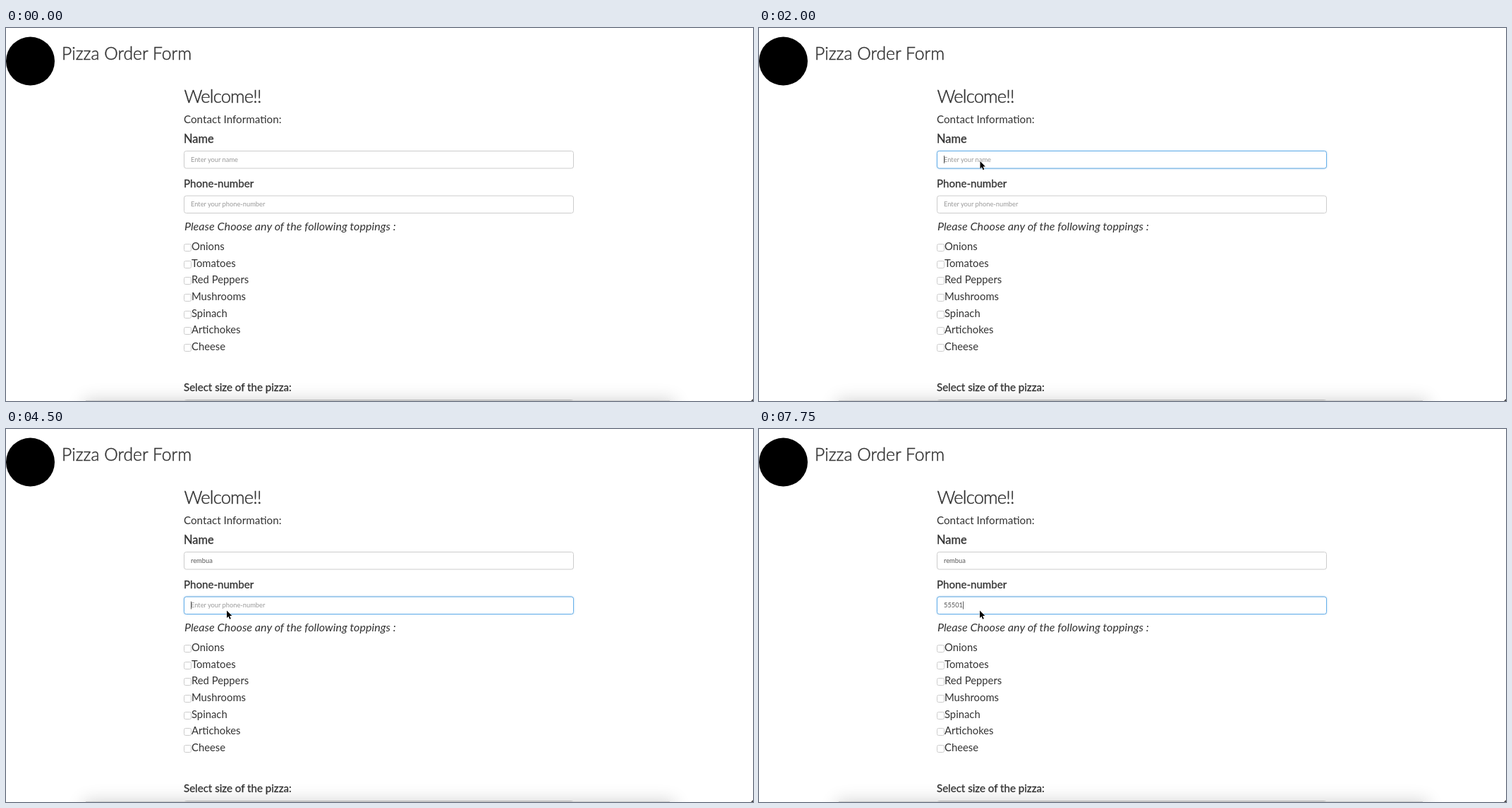
An HTML page that plays this animation: 1059 px wide and 529 px high, repeating every 8 s.

```html
<!DOCTYPE html>
<html lang="en">
<head>
<meta charset="utf-8">
<title>Pizza Order Form</title>
<style>
html, body { margin: 0; width: 100%; height: 100%; overflow: hidden; background: #fff; }
svg { display: block; font-family: Lato, "Open Sans", sans-serif; fill: #333; }
text { white-space: pre; }
.title { font-weight: 300; stroke: #333; stroke-width: .45px; }
.label { stroke: #333; stroke-width: .3px; }
.box { fill: #fff; stroke: #ccc; }
.glow { fill: #fff; stroke: #66afe9; filter: drop-shadow(0 0 1.5px rgba(102,175,233,.45)); }
.entry { font-size: 9.3px; }
</style>
</head>
<body>
<svg id="stage" width="1059" height="529" viewBox="0 0 1059 529">
  <defs>
    <filter id="blur" x="-20%" y="-200%" width="140%" height="500%"><feGaussianBlur stdDeviation="12"/></filter>
  </defs>
  <circle cx="34.5" cy="47" r="34.5" fill="#000"/>
  <text class="title" x="79" y="45" font-size="24.7">Pizza Order Form</text>
  <text class="title" x="252.5" y="106" font-size="25.5" letter-spacing="-.8">Welcome!!</text>
  <text x="252" y="134.5" font-size="15.2">Contact Information:</text>
  <text class="label" x="252" y="163" font-size="16.4">Name</text>
  <text class="label" x="252" y="226" font-size="15.1">Phone-number</text>
  <text x="253" y="287" font-size="16.15" font-style="italic">Please Choose any of the following toppings :</text>
  <g id="toppings" font-size="14.8"></g>
  <text class="label" x="252" y="515" font-size="15.1">Select size of the pizza:</text>
  <rect class="box" x="252.5" y="527.5" width="552" height="25" rx="3"/>
  <g id="fields"></g>
  <rect x="110" y="527" width="838" height="45" fill="#000" opacity=".17" filter="url(#blur)"/>
  <rect x="113" y="528" width="828" height="1" fill="#ccc"/>
  <path d="M1059 526v3h-3z" fill="#444"/>
  <path id="cursor" d="M0 0V10.4l2.4-2.2 1.7 4 1.7-.7-1.7-3.9H7.4z" fill="#000" stroke="#fff" paint-order="stroke"/>
</svg>
<script>
const LOOP = 8000;
const $ = id => document.getElementById(id);

function add(parent, tag, attrs, text = '') {
  const el = document.createElementNS('http://www.w3.org/2000/svg', tag);
  for (const key in attrs) el.setAttribute(key, attrs[key]);
  el.textContent = text;
  return parent.appendChild(el);
}

// Value of the last [time, value] step that has begun
const at = (steps, t) => steps.reduce((value, step) => t >= step[0] ? step[1] : value, steps[0][1]);

// On/off state toggled at each listed time, starting off
const toggled = (times, t) => times.filter(time => t >= time).length % 2 === 1;

['Onions', 'Tomatoes', 'Red Peppers', 'Mushrooms', 'Spinach', 'Artichokes', 'Cheese'].forEach((name, i) => {
  const y = 315 + i * 23.65;
  add($('toppings'), 'rect', { class: 'box', x: 252.5, y: Math.round(y - 9) + .5, width: 10, height: 10, rx: 2 });
  add($('toppings'), 'text', { x: 263, y }, name);
});

const fields = [
  {
    y: 174.5, hint: 'Enter your name',
    focus: [[0, 0], [2000, 1], [4250, .5], [4500, 0]],
    typed: [[0, ''], [2750, 're'], [3000, 'remb'], [3250, 'rembu'], [3500, 'rembua']],
    blink: [2000, 2250, 2750, 4000]
  },
  {
    y: 238, hint: 'Enter your phone-number',
    focus: [[0, 0], [4250, .5], [4500, 1]],
    typed: [[0, ''], [5000, '55'], [5250, '556'], [6000, '55'], [6250, '555'], [7000, '5550'], [7750, '55501']],
    blink: [4250, 4750, 5000, 5750, 6250, 6750, 7000, 7500, 7750]
  }
];

for (const f of fields) {
  const frame = { x: 252.5, y: f.y, width: 552, height: 24.5, rx: 3 };
  add($('fields'), 'rect', { class: 'box', ...frame });
  f.glow = add($('fields'), 'rect', { class: 'glow', ...frame });
  f.text = add($('fields'), 'text', { class: 'entry', x: 262, y: f.y + 15.3 });
  f.caret = add($('fields'), 'rect', { y: f.y + 6.5, width: 1, height: 11 });
}

const cursorPath = [
  [0, [-50, -50]], [500, [521, 99]], [750, [348, 179]], [1000, [325.5, 191]],
  [1750, [313.5, 189]], [4000, [322, 241]], [4250, [313, 257.5]]
];

function draw(t) {
  for (const f of fields) {
    const typed = at(f.typed, t);
    f.glow.style.opacity = at(f.focus, t);
    f.text.textContent = typed || f.hint;
    f.text.style.fill = typed ? '#555' : '#999';
    f.caret.setAttribute('x', Math.round(262 + (typed ? f.text.getComputedTextLength() : 0)));
    f.caret.style.opacity = toggled(f.blink, t) ? .8 : 0;
  }
  $('cursor').setAttribute('transform', `translate(${at(cursorPath, t)})`);
}

const start = performance.now();
function tick() {
  draw((performance.now() - start) % LOOP);
  requestAnimationFrame(tick);
}
tick();
</script>
</body>
</html>
```
